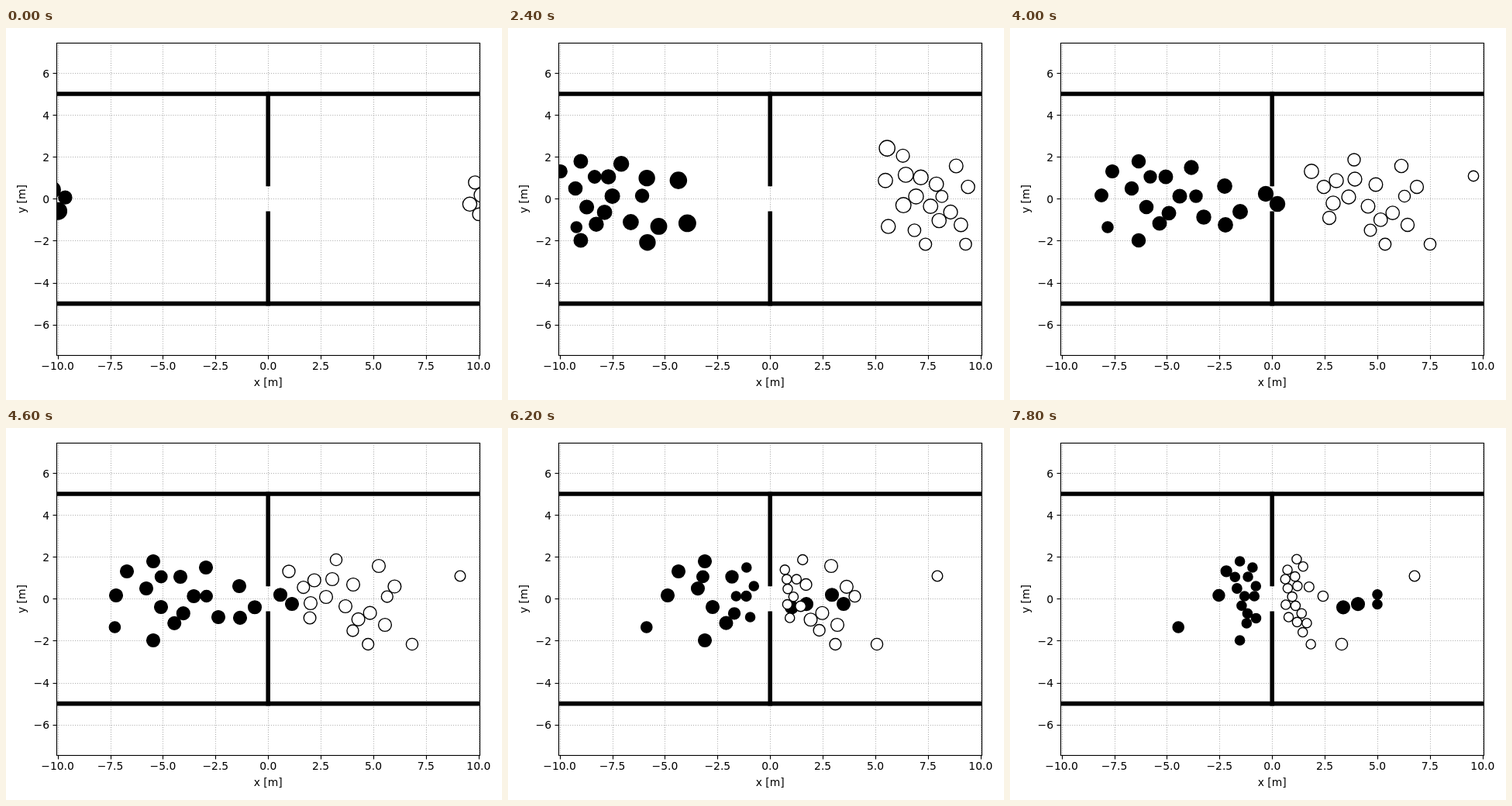
Write an HTML page with a canvas that moves like this. It is 640 by 480 pixels and loops after 8 s.

```html
<!DOCTYPE html>
<html lang="en">
<head>
<meta charset="utf-8">
<title>Two crowds at a door</title>
<style>
  html, body { margin: 0; width: 100%; height: 100%; overflow: hidden; background: #fff; }
  canvas { display: block; }
</style>
</head>
<body>
<canvas id="stage" width="640" height="480"></canvas>
<script>
const ctx = document.getElementById('stage').getContext('2d');
const LOOP = 8000, STEP = 200;
const LEFT = 65.5, RIGHT = 611.5, TOP = 19.5, BOTTOM = 422.5;
const plotX = x => 338.2 + 27.16 * x;
const plotY = y => 220.3 - 27.06 * y;

const DOOR = { x: 338, y: 220 };
const MEET = 4;          // seconds until the crowds reach the door
const FREE_SPEED = 40;   // pixels per second
const WALL_GAP = 16;

// Where each walker stands when the crowds meet: x, y and, for slow ones, pace.
const rightward = {
  fill: '#000', heading: 1, passing: 4,
  walkers: [
    [345, 227], [330, 214], [297, 237], [278, 254], [277, 204],
    [250, 244], [240, 217, .75], [234, 180], [219, 217], [204, 240],
    [201, 192], [194, 251], [181, 192, .8], [176, 231], [166, 172],
    [166, 274], [157, 207], [132, 185], [126, 257, .6], [118, 216]
  ]
};
const leftward = {
  fill: '#fff', heading: -1, passing: 0,
  walkers: [
    [389, 185], [405, 205, .85], [412, 245, .83], [417, 226], [421, 197],
    [437, 218], [444, 170, .75], [445, 195], [462, 230], [465, 261, .72],
    [472, 202], [479, 247], [484, 279, .7], [493, 239], [505, 178],
    [509, 217, .7], [513, 254], [525, 205], [542, 279, .75], [598, 191, .5]
  ]
};

const clamp = (v, low, high) => Math.min(high, Math.max(low, v));

// Walkers who cannot pass close up behind the wall; the queue deepens with time.
function queue(distance, t) {
  const depth = 2 + 53 * Math.max(0, (t - MEET) / 3.8);
  const excess = depth + WALL_GAP - distance;
  return excess > 0 ? WALL_GAP + depth * Math.exp(-excess / (1.2 * depth)) : distance;
}

// Paths narrow towards the door.
const funnel = distance => clamp(.2 + distance / 150, .2, 1);

function position([x, y, pace = 1], heading, passes, t) {
  const start = (DOOR.x - x) * heading;
  const speed = t < MEET ? 70 - .145 * start : FREE_SPEED;
  let distance = start - speed * pace * (t - MEET);
  distance = passes ? Math.max(distance, -136) : queue(distance, t);
  const fan = .25 + .75 * Math.sin(clamp(t / 1.4, 0, 1) * Math.PI / 2);
  const width = funnel(passes ? distance : Math.max(distance, start)) / funnel(start);
  return { x: DOOR.x - heading * distance, y: DOOR.y + (y - DOOR.y) * width * fan };
}

// The faster a walker moves, the more room it takes.
function body(walker, heading, passes, t) {
  const at = time => position(walker, heading, passes, time);
  const speed = Math.abs(at(t + .05).x - at(t - .05).x) * 10;
  return { ...at(t), r: clamp(5.5 + speed / 13, 6.3, 11.7) };
}

function separate(bodies) {
  for (let pass = 0; pass < 5; pass++) {
    bodies.forEach((a, i) => bodies.slice(i + 1).forEach(b => {
      const dx = b.x - a.x, dy = b.y - a.y, gap = Math.hypot(dx, dy) || 1;
      const push = Math.max(0, a.r + b.r - gap) / 2 / gap;
      a.x -= dx * push;
      a.y -= dy * push;
      b.x += dx * push;
      b.y += dy * push;
    }));
  }
  return bodies;
}

function line(x1, y1, x2, y2) {
  ctx.beginPath();
  ctx.moveTo(x1, y1);
  ctx.lineTo(x2, y2);
  ctx.stroke();
}

function clipped(draw) {
  ctx.save();
  ctx.beginPath();
  ctx.rect(LEFT, TOP, RIGHT - LEFT - .5, BOTTOM - TOP);
  ctx.clip();
  draw();
  ctx.restore();
}

const label = (value, digits) => value.toFixed(digits).replace('-', '\u2212');
const snap = v => Math.round(v) + .5;

function drawGrid() {
  ctx.font = '13.89px "DejaVu Sans", sans-serif';
  ctx.fillStyle = '#000';
  ctx.lineWidth = 1.11;
  const rule = (x1, y1, x2, y2) => {
    ctx.strokeStyle = '#b0b0b0';
    ctx.setLineDash([1.11, 1.83]);
    line(x1, y1, x2, y2);
    ctx.strokeStyle = '#000';
    ctx.setLineDash([]);
  };
  ctx.textAlign = 'center';
  for (let v = -10; v <= 10; v += 2.5) {
    const x = snap(plotX(v));
    rule(x, BOTTOM, x, TOP);
    line(x, BOTTOM, x, BOTTOM + 5);
    ctx.fillText(label(v, 1), plotX(v), 441);
  }
  ctx.fillText('x [m]', DOOR.x + .2, 462);
  ctx.textAlign = 'right';
  for (let v = -6; v <= 6; v += 2) {
    const y = snap(plotY(v));
    rule(LEFT, y, RIGHT, y);
    line(LEFT - 5, y, LEFT, y);
    ctx.fillText(label(v, 0), 56, plotY(v) + 5.6);
  }
  ctx.save();
  ctx.translate(25, 220.6);
  ctx.rotate(-Math.PI / 2);
  ctx.textAlign = 'center';
  ctx.fillText('y [m]', 0, 0);
  ctx.restore();
}

function drawWalls() {
  ctx.strokeStyle = '#000';
  ctx.lineWidth = 5.56;
  ctx.lineCap = 'square';
  for (const side of [-1, 1]) {
    const y = plotY(5 * side);
    line(plotX(-10), y, plotX(10), y);
    line(plotX(0), y, plotX(0), plotY(.7 * side));
  }
  ctx.lineCap = 'butt';
}

function drawCrowd({ fill, heading, passing, walkers }, t) {
  ctx.lineWidth = 1.39;
  ctx.fillStyle = fill;
  const bodies = walkers.map((walker, i) => body(walker, heading, i < passing, t));
  for (const { x, y, r } of separate(bodies)) {
    ctx.beginPath();
    ctx.arc(x, y, r - .2, 0, 2 * Math.PI);
    ctx.fill();
    ctx.stroke();
  }
}

function frame() {
  const t = Math.floor(performance.now() % LOOP / STEP) * STEP / 1000;
  ctx.fillStyle = '#fff';
  ctx.fillRect(0, 0, 640, 480);
  drawGrid();
  clipped(() => {
    drawWalls();
    drawCrowd(rightward, t);
    drawCrowd(leftward, t);
  });
  ctx.lineWidth = 1.11;
  ctx.strokeRect(LEFT, TOP, RIGHT - LEFT, BOTTOM - TOP);
  requestAnimationFrame(frame);
}
frame();
</script>
</body>
</html>
```
